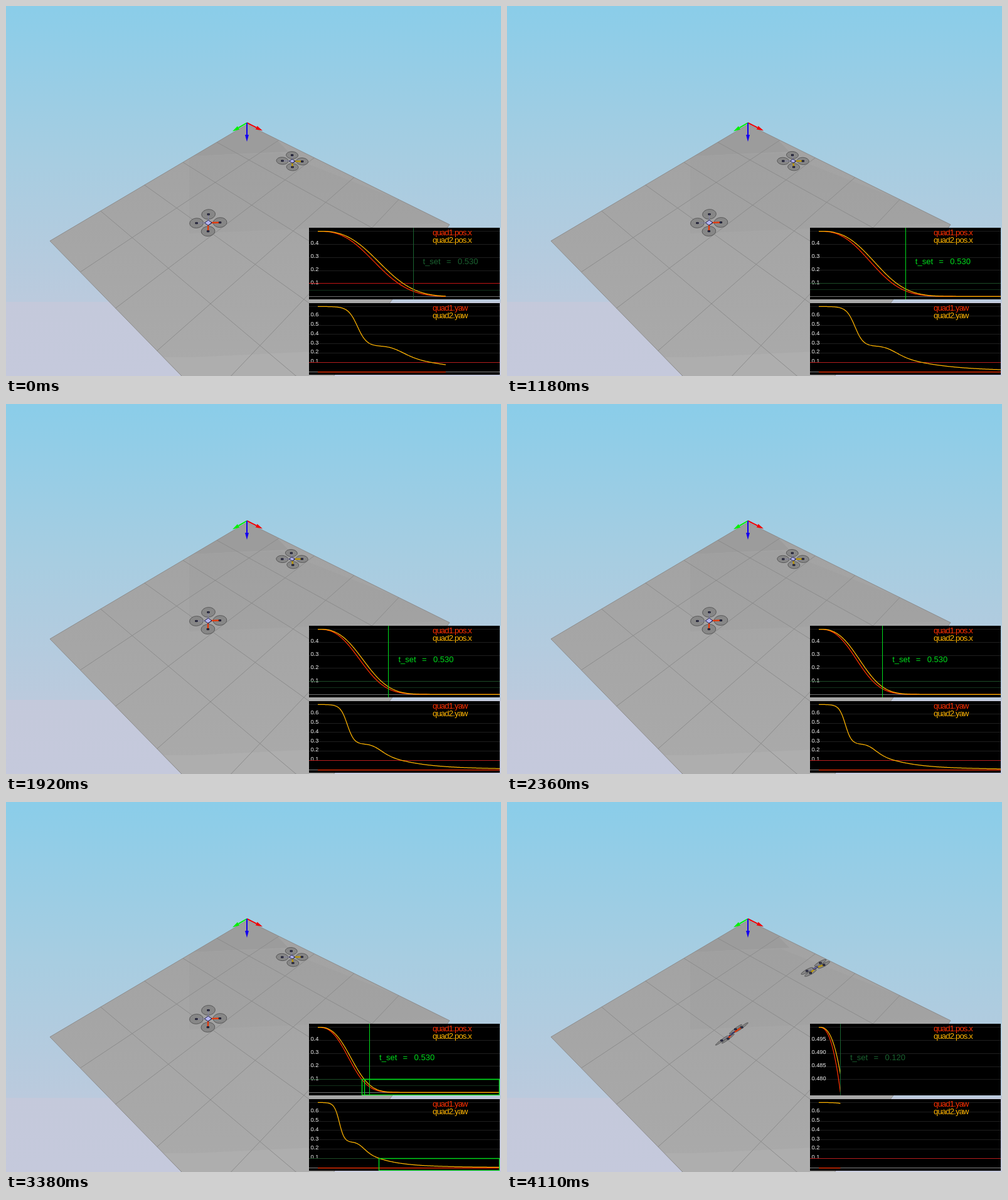
Recreate the animation shown at these times as an HTML page with a canvas. Size 789x589 px, loop 4.21 s.

```html
<!DOCTYPE html>
<html lang="en">
<head>
<meta charset="utf-8">
<title>Two quadrotors, step response</title>
<style>
html, body { margin: 0; width: 100%; height: 100%; overflow: hidden; background: #c5c9dc; }
canvas { display: block; }
</style>
</head>
<body>
<canvas id="stage" width="789" height="589"></canvas>
<script>
const ctx = document.getElementById('stage').getContext('2d');

const LOOP = 4210, STEP = 146, DT = 0.05;
const RESET = 26; // the run restarts here
const simTime = k => k < RESET ? 0.711 + DT * k : 0.02 + DT * (k - RESET);

// Step responses: both positions fall from 0.5, one heading turns from 0.7 to 0.
const decay = (tau, n) => t => 0.5 * Math.exp(-((t / tau) ** n));
const pos1 = decay(0.375, 2.61), pos2 = decay(0.4, 2.75);
const yaw1 = () => 0;
const yaw2 = t => 0.39 / (1 + Math.exp((t - 0.22) / 0.025))
  + 0.31 / (1 + (t / 0.5) ** 3.3)
  + 0.05 * Math.exp(-(((t - 0.41) / 0.1) ** 2));

const RED = '#ff3000', AMBER = '#ffb400', GREEN = '#00dc1c', DIM = '#1a6230';

function trace(points) {
  ctx.beginPath();
  points.forEach(([x, y]) => ctx.lineTo(x, y));
}

function line(points, color, width = 1) {
  trace(points);
  ctx.strokeStyle = color;
  ctx.lineWidth = width;
  ctx.stroke();
}

function fillPoly(points, color) {
  trace(points);
  ctx.closePath();
  ctx.fillStyle = color;
  ctx.fill();
}

function text(str, x, y, color, size = 13, spacing = 0) {
  ctx.font = size + 'px "Liberation Sans", Arial, sans-serif';
  ctx.letterSpacing = spacing + 'px';
  ctx.fillStyle = color;
  ctx.fillText(str, x, y);
}

function gradient(height, from, ...stops) {
  const g = ctx.createLinearGradient(0, from, 0, from + height);
  stops.forEach(([at, color]) => g.addColorStop(at, color));
  return g;
}

// Floor in perspective: u runs to the right, v to the left.
function floorPoint(u, v) {
  const w = 1 - 0.0505 * u - 0.0557 * v;
  return [(384 + 28.91 * u - 66.7 * v) / w, (188.5 + 14.33 * u + 16.27 * v) / w];
}

function drawScene() {
  ctx.fillStyle = gradient(589, 0, [0, '#8acde9'], [0.42, '#a7cde1'], [0.8, '#bbcadd'], [0.8, '#c4c9db'], [1, '#c5c9dc']);
  ctx.fillRect(0, 0, 789, 589);

  fillPoly([floorPoint(0, 0), floorPoint(5, 0), floorPoint(5, 5), floorPoint(0, 5)],
    gradient(403, 186, [0, '#a2a2a2'], [1, '#aaaaaa']));
  ctx.save();
  ctx.clip();
  fillPoly([[290, 239], [450, 232], [400, 180], [370, 180]], '#9c9c9c');
  fillPoly([[230, 559], [300, 559], [490, 550], [560, 600], [250, 600]], '#aeaeae');
  fillPoly([[292, 239], [437, 234], [720, 345], [292, 362]], 'rgba(0,0,0,.018)');
  ctx.restore();
  for (let i = 0; i <= 5; i++) {
    line([floorPoint(i, 0), floorPoint(i, 5)], '#8c8c8c');
    line([floorPoint(0, i), floorPoint(5, i)], '#8c8c8c');
  }

  axis(409, 198.5, '#f00000');
  axis(361, 199.5, '#00f000');
  axis(384, 216, '#1400f0');
}

function axis(x, y, color) {
  const dx = x - 384, dy = y - 186, len = Math.hypot(dx, dy), ux = dx / len, uy = dy / len;
  const bx = x - ux * 11, by = y - uy * 11;
  line([[384, 186], [bx, by]], color, 2);
  fillPoly([[x, y], [bx - uy * 3, by + ux * 3], [bx + uy * 3, by - ux * 3]], color);
}

// A quad is a flat unit cross seen through two screen vectors, [ax, ay, bx, by].
const quads = [
  { pos: pos1, yaw: yaw1, home: [322.2, 345], move: [76, 51], arm: '#e43a0c', r: 0.58,
    level: [18.75, -0.5, -0.3, 13.5], tilt: [16, -10.5, -6, 7.5] },
  { pos: pos2, yaw: yaw2, home: [456, 246.8], move: [74, 36], arm: '#b8960c', r: 0.6,
    level: [15.75, -0.2, 1.4, 9.5], tilt: [13.5, -4.8, -7.8, 8] }
];

function turn([ax, ay, bx, by], angle) {
  const c = Math.cos(angle), s = Math.sin(angle);
  return [ax * c + bx * s, ay * c + by * s, bx * c - ax * s, by * c - ay * s];
}

function drawQuad(q, t, fresh) {
  const p = q.pos(t), s = Math.min(1, t / 0.12);
  const lean = fresh ? s * s * (3 - 2 * s) : 0;
  const [ax, ay, bx, by] = turn(q.level, q.yaw(t)).map((v, i) => v + (q.tilt[i] - v) * lean);
  const cx = q.home[0] + p * q.move[0], cy = q.home[1] + p * q.move[1];
  const at = (u, v) => [cx + ax * u + bx * v, cy + ay * u + by * v];
  const arms = [[0, -1], [-1, 0], [1, 0], [0, 1]];

  arms.forEach(([u, v]) => {
    const [x, y] = at(u, v);
    ctx.save();
    ctx.transform(ax, ay, bx, by, x, y);
    ctx.beginPath();
    ctx.arc(0, 0, q.r, 0, 7);
    ctx.restore();
    ctx.fillStyle = '#878787';
    ctx.fill();
    ctx.strokeStyle = '#585858';
    ctx.lineWidth = 1;
    ctx.stroke();
  });
  arms.forEach(([u, v]) => {
    const front = u + v > 0;
    line([at(u * 0.25, v * 0.25), at(u * 0.9, v * 0.9)], front ? q.arm : '#8484a4', front ? 2.4 : 1);
  });
  arms.forEach(([u, v]) => {
    const [x, y] = at(u, v);
    ctx.fillStyle = '#101024';
    ctx.fillRect(x - 2, y - 1.5, 4, 3);
    ctx.fillStyle = '#9494b4';
    ctx.fillRect(x - 0.5, y - 0.5, 1, 1);
  });
  const body = [at(0.31, 0), at(0, 0.31), at(-0.31, 0), at(0, -0.31)];
  fillPoly(body, '#b4b4f0');
  line([...body, body[0], body[1]], '#20204c');
}

const X0 = 497, RIGHT = 787;
const snap = v => Math.floor(v) + 0.5;

function panel(top, draw) {
  ctx.save();
  ctx.beginPath();
  ctx.rect(483, top, 304, 114);
  ctx.clip();
  ctx.fillStyle = '#000';
  ctx.fillRect(483, top, 304, 114);
  draw();
  ctx.restore();
}

const level = (y, color) => line([[483, snap(y)], [RIGHT, snap(y)]], color);

function box(x, top, bottom) {
  ctx.strokeStyle = GREEN;
  ctx.lineWidth = 1.4;
  ctx.strokeRect(snap(x), snap(top), RIGHT - 0.5 - snap(x), bottom - 0.5 - snap(top));
}

function ticks(lo, hi, step, Y, top) {
  const places = Math.max(1, Math.ceil(-Math.log10(step) - 1e-9));
  for (let i = Math.ceil(lo / step - 1e-6); i * step <= hi + 1e-9; i++) {
    const y = Y(i * step);
    level(y, '#1e1e1e');
    if (y > top + 12 && y < top + 104) text((i * step).toFixed(places), 485.5, y + 1, '#f0f0f0', 9.2);
  }
}

function plot(fn, t, scale, Y, color) {
  const pts = [], end = Math.min(RIGHT, X0 + t * scale);
  for (let x = X0; x < end; x++) pts.push([x, Y(fn((x - X0) / scale))]);
  pts.push([end, Y(fn((end - X0) / scale))]);
  line(pts, color, 1.25);
}

function legend(name, top) {
  text('quad1.' + name, 680, top + 12, RED, 13, -0.8);
  text('quad2.' + name, 680, top + 23.5, AMBER, 13, -0.8);
}

// Smallest 1-2-5 step that gives about five ticks.
function niceStep(range) {
  const raw = range / 5 * 0.95, mag = 10 ** Math.floor(Math.log10(raw));
  return [1, 2, 5, 10].find(m => m * mag >= raw) * mag;
}

function drawPos(t, scale, fresh) {
  const lo = Math.min(pos1(t), pos2(t)), range = 0.5 - lo;
  const Y = v => 358.5 + (0.5 - v) / range * 103.8;
  const settled = t > 1.03, boxed = t > 1.74;
  const tset = Math.min(t, 0.53), xs = X0 + tset * scale;
  const ink = settled ? GREEN : DIM;

  ticks(fresh ? lo : 0, 0.5, niceStep(range), Y, 353);
  if (!fresh) {
    level(Y(0), '#707070');
    level(Y(0.05), '#12301a');
    level(Y(0.1), settled ? '#1c4a26' : '#c01414');
  }
  plot(pos1, t, scale, Y, RED);
  plot(pos2, t, scale, Y, AMBER);
  if (boxed) [0.45, 0.475].forEach(s => box(X0 + s * scale, Y(0.1), 467));
  line([[snap(xs), 353], [snap(xs), 467]], ink);

  text('t_set', xs + 15.5, 411, ink);
  text('=', xs + 53, 411, ink);
  text(tset.toFixed(3), xs + 71, 411, ink);
  legend('pos.x', 353);
}

function drawYaw(t, scale) {
  const Y = v => 582 - v * 148;
  const boxed = t > 1.64;
  ticks(0, 0.7, 0.1, Y, 473);
  level(Y(0), '#808080');
  level(Y(0.1), boxed ? '#1c4a26' : '#b41c1c');
  plot(yaw1, t, scale, v => snap(Y(v)), RED);
  plot(yaw2, t, scale, Y, AMBER);
  if (boxed) box(X0 + 0.625 * scale, Y(0.1), 587);
  legend('yaw', 473);
}

function draw(k) {
  const t = simTime(k), fresh = k >= RESET;
  const scale = (RIGHT - X0) / Math.max(1.011, t);
  drawScene();
  quads.forEach(q => drawQuad(q, t, fresh));
  panel(353, () => drawPos(t, scale, fresh));
  panel(473, () => drawYaw(t, scale));
}

const begin = performance.now();
let shown = -1;
function tick() {
  const k = Math.floor((performance.now() - begin) % LOOP / STEP);
  if (k !== shown) draw(shown = k);
  requestAnimationFrame(tick);
}
tick();
</script>
</body>
</html>
```
